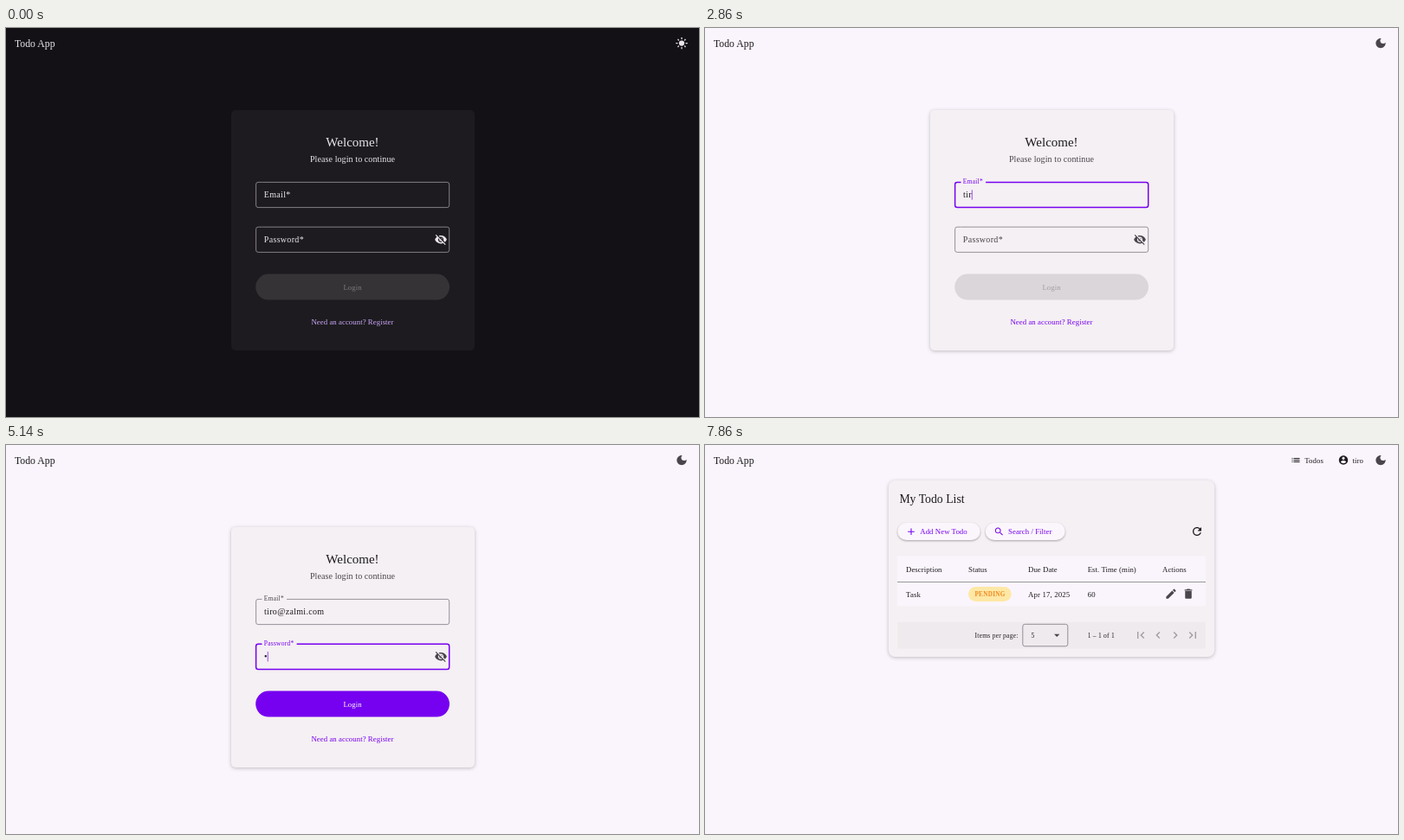
These frames come from a looping animation (800x450 px, 8000 ms). An HTML page:

```html
<!DOCTYPE html>
<html lang="en">
<head>
<meta charset="utf-8">
<title>Todo App</title>
<style>
  html, body { margin: 0; width: 100%; height: 100%; overflow: hidden; }
  svg {
    display: block; width: 100vw; height: 100vh;
    font-family: "Liberation Serif", "Times New Roman", serif;
    --bg: #faf5fc; --card: #f5f0f3; --ink: #1d1b1f; --soft: #4a454d; --line: #8d8790;
    --accent: #7600f0; --off: #dbd6da; --offInk: #a39ea3; --hover: #e3dee4;
    --shadow: rgba(0, 0, 0, .24);
  }
  svg.dark {
    --bg: #131115; --card: #1d1b1f; --ink: #e9e4ea; --soft: #e9e4ea; --line: #8f8a92;
    --accent: #cba8fa; --off: #353336; --offInk: #7c787d; --hover: #2d2b2f;
    --shadow: transparent;
  }
  text { fill: var(--ink); white-space: pre; }
  .mid { text-anchor: middle; }
  .soft { fill: var(--soft); }
  .accent { fill: var(--accent); }
  .body { font-size: 10px; letter-spacing: .3125px; }
  .label { font-size: 8.75px; letter-spacing: .0625px; }
  .cell { font-size: 8.75px; letter-spacing: .156px; }
  .small { font-size: 7.5px; letter-spacing: .25px; }
  .float { font-size: 7.5px; letter-spacing: .234px; }
  .card { fill: var(--card); filter: drop-shadow(0 1.5px 2px var(--shadow)); }
  .pill { fill: #fbf6fc; filter: drop-shadow(0 1px 1px rgba(0, 0, 0, .32)); }
  .outline { fill: none; }
</style>
</head>
<body>
<svg id="stage" viewBox="0 0 800 450">
  <rect width="800" height="450" fill="var(--bg)"/>
  <text x="10" y="22" font-size="11.75">Todo App</text>
  <circle id="themeHover" cx="780" cy="17.5" r="10" fill="var(--hover)"/>
  <g id="sun" transform="translate(780 17.5) scale(.625)" fill="var(--ink)" stroke="var(--ink)" stroke-width="2" stroke-linecap="round">
    <circle r="5" stroke="none"/>
  </g>
  <g id="moon"></g>

  <g id="login">
    <rect class="card" x="260" y="95" width="281" height="278" rx="5"/>
    <text class="mid" x="400" y="137" font-size="15">Welcome!</text>
    <text class="mid soft" x="400" y="155.2" font-size="10" letter-spacing=".094">Please login to continue</text>
    <g id="email"></g>
    <g id="password"></g>
    <circle id="eyeHover" cx="502" cy="244.7" r="10" fill="var(--hover)"/>
    <g id="eye"></g>
    <rect id="button" x="288.2" y="284.6" width="223.8" height="30" rx="15"/>
    <text id="buttonText" class="label mid" x="400" y="302.7">Login</text>
    <text class="label mid accent" x="400" y="343">Need an account? Register</text>
  </g>

  <g id="todos">
    <text class="label" x="692.3" y="20.5">Todos</text>
    <text class="label" x="747.5" y="20.5">tiro</text>
    <rect class="card" x="212" y="41" width="376" height="204" rx="7.5"/>
    <text x="224.4" y="67.3" font-size="13.75">My Todo List</text>
    <rect class="pill" x="222.3" y="90" width="95.4" height="20" rx="10"/>
    <rect class="pill" x="323.7" y="90" width="92" height="20" rx="10"/>
    <text class="label accent" x="248.3" y="103">Add New Todo</text>
    <text class="label accent" x="350" y="103">Search / Filter</text>
    <rect x="222" y="128.5" width="356" height="58" fill="var(--bg)"/>
    <rect x="222" y="158" width="356" height=".8" fill="#858088"/>
    <g id="table"></g>
    <rect x="304" y="164" width="49.7" height="17" rx="8.5" fill="#fee8a6"/>
    <text class="mid" x="329" y="175.2" font-size="7.2" font-weight="bold" letter-spacing=".3" style="fill:#ee8a1f">PENDING</text>
    <rect x="222" y="205" width="356" height="30.5" fill="#efeaee"/>
    <text class="small" x="311.6" y="222.8">Items per page:</text>
    <rect x="366.8" y="207.3" width="52" height="25.5" rx="2.5" fill="none" stroke="#7d7880" stroke-width=".8"/>
    <text class="small" x="376.5" y="222.8">5</text>
    <path d="M403 218.7h6.4l-3.2 3.2z" fill="#4a454d"/>
    <text class="small" x="441.7" y="222.8">1 – 1 of 1</text>
  </g>
</svg>
<script>
const NS = "http://www.w3.org/2000/svg";
const LOOP = 8000;
const ADDRESS = "tiro@zalmi.com";
const $ = id => document.getElementById(id);
const stage = $("stage");

function add(parent, tag, attrs, text = "") {
  const node = document.createElementNS(NS, tag);
  for (const key in attrs) node.setAttribute(key, attrs[key]);
  node.textContent = text;
  return parent.appendChild(node);
}

const show = (node, on) => node.setAttribute("visibility", on ? "visible" : "hidden");
const display = (node, on) => { node.style.display = on ? "" : "none"; };

// Icons live on a 24-unit grid and are placed by their centre.
const ICONS = {
  moon: "M12 3c-4.97 0-9 4.03-9 9s4.03 9 9 9 9-4.03 9-9c0-.46-.04-.92-.1-1.36-.98 1.37-2.58 2.26-4.4 2.26-2.98 0-5.4-2.42-5.4-5.4 0-1.81.89-3.42 2.26-4.4-.44-.06-.9-.1-1.36-.1z",
  eyeOff: "M12 7c2.76 0 5 2.24 5 5 0 .65-.13 1.26-.36 1.83l2.92 2.92c1.51-1.26 2.7-2.89 3.43-4.75-1.73-4.39-6-7.5-11-7.5-1.4 0-2.74.25-3.98.7l2.16 2.16C10.74 7.13 11.35 7 12 7zM2 4.27l2.28 2.28.46.46C3.08 8.3 1.78 10.02 1 12c1.73 4.39 6 7.5 11 7.5 1.55 0 3.03-.3 4.38-.84l.42.42L19.73 22 21 20.73 3.27 3 2 4.27zM7.53 9.8l1.55 1.55c-.05.21-.08.43-.08.65 0 1.66 1.34 3 3 3 .22 0 .44-.03.65-.08l1.55 1.55c-.67.33-1.41.53-2.2.53-2.76 0-5-2.24-5-5 0-.79.2-1.53.53-2.2zm4.31-.78l3.15 3.15.02-.16c0-1.66-1.34-3-3-3l-.17.01z",
  list: "M3 13h2v-2H3v2zm0 4h2v-2H3v2zm0-8h2V7H3v2zm4 4h14v-2H7v2zm0 4h14v-2H7v2zM7 7v2h14V7H7z",
  account: "M12 2C6.48 2 2 6.48 2 12s4.48 10 10 10 10-4.48 10-10S17.52 2 12 2zm0 3c1.66 0 3 1.34 3 3s-1.34 3-3 3-3-1.34-3-3 1.34-3 3-3zm0 14.2c-2.5 0-4.71-1.28-6-3.22.03-1.99 4-3.08 6-3.08 1.99 0 5.97 1.09 6 3.08-1.29 1.94-3.5 3.22-6 3.22z",
  plus: "M19 13h-6v6h-2v-6H5v-2h6V5h2v6h6v2z",
  search: "M15.5 14h-.79l-.28-.27C15.41 12.59 16 11.11 16 9.5 16 5.91 13.09 3 9.5 3S3 5.91 3 9.5 5.91 16 9.5 16c1.61 0 3.09-.59 4.23-1.57l.27.28v.79l5 4.99L20.49 19l-4.99-5zm-6 0C7.01 14 5 11.99 5 9.5S7.01 5 9.5 5 14 7.01 14 9.5 11.99 14 9.5 14z",
  refresh: "M17.65 6.35C16.2 4.9 14.21 4 12 4c-4.42 0-7.99 3.58-7.99 8s3.57 8 7.99 8c3.73 0 6.84-2.55 7.73-6h-2.08c-.82 2.33-3.04 4-5.65 4-3.31 0-6-2.69-6-6s2.69-6 6-6c1.66 0 3.14.69 4.22 1.78L13 11h7V4l-2.35 2.35z",
  pencil: "M3 17.25V21h3.75L17.81 9.94l-3.75-3.75L3 17.25zM20.71 7.04c.39-.39.39-1.02 0-1.41l-2.34-2.34c-.39-.39-1.02-.39-1.41 0l-1.83 1.83 3.75 3.75 1.83-1.83z",
  bin: "M6 19c0 1.1.9 2 2 2h8c1.1 0 2-.9 2-2V7H6v12zM19 4h-3.5l-1-1h-5l-1 1H5v2h14V4z",
  first: "M18.41 16.59L13.82 12l4.59-4.59L17 6l-6 6 6 6zM6 6h2v12H6z",
  prev: "M15.41 7.41L14 6l-6 6 6 6 1.41-1.41L10.83 12z",
  next: "M10 6L8.59 7.41 13.17 12l-4.58 4.59L10 18l6-6z",
  last: "M5.59 7.41L10.18 12l-4.59 4.59L7 18l6-6-6-6zM16 6h2v12h-2z"
};

function icon(parent, name, x, y, fill = "var(--soft)", scale = .625) {
  add(parent, "path", {
    d: ICONS[name], fill,
    transform: `translate(${x} ${y}) scale(${scale}) translate(-12 -12)`
  });
}

for (let i = 0; i < 8; i++) {
  const [from, to] = i % 2 ? [8, 9.5] : [8, 10];
  add($("sun"), "path", { d: `M${from} 0H${to}`, transform: `rotate(${i * 45})` });
}
icon($("moon"), "moon", 780, 17.5);
icon($("eye"), "eyeOff", 502, 244.7);

const todos = $("todos");
icon(todos, "list", 682, 17.5, "var(--ink)", .5);
icon(todos, "account", 737, 17.5, "var(--ink)", .52);
icon(todos, "plus", 238, 100.2, "var(--accent)", .54);
icon(todos, "search", 339.5, 100.2, "var(--accent)", .52);
icon(todos, "refresh", 568, 100, "var(--ink)");
icon(todos, "pencil", 538, 172.2);
icon(todos, "bin", 558, 172.2);
["first", "prev", "next", "last"].forEach((name, i) =>
  icon(todos, name, 503 + i * 20, 220, "#a09ba1", .66));

const columns = [
  [232, "Description", "Task"], [304, "Status", ""], [373, "Due Date", "Apr 17, 2025"],
  [441.7, "Est. Time (min)", "60"], [528, "Actions", ""]
];
for (const [x, head, value] of columns) {
  add($("table"), "text", { x, y: 147, class: "label" }, head);
  add($("table"), "text", { x, y: 175.8, class: "cell" }, value);
}

function makeField(group, name, top) {
  const border = add(group, "path", { class: "outline" });
  const label = add(group, "text", { x: 297.8 }, name + "*");
  const value = add(group, "text", { x: 298, y: top + 18.3, class: "body" });
  const caret = add(group, "rect", { y: top + 9.3, width: .7, height: 11.4, fill: "var(--accent)" });
  return ({ text, focus, tone = "var(--line)" }) => {
    const raised = focus || text !== "";
    label.setAttribute("class", raised ? "float" : "body");
    label.setAttribute("y", raised ? top + 2.1 : top + 18.3);
    label.style.fill = focus ? "var(--accent)" : "var(--soft)";
    value.textContent = text;
    const l = 288.6, r = 511.7, t = top + .4, b = top + 29.6, c = 2.5;
    const gap = raised ? 298 + label.getComputedTextLength() + 3 : 295.5;
    border.setAttribute("d", `M${gap} ${t}H${r - c}Q${r} ${t} ${r} ${t + c}V${b - c}Q${r} ${b} ${r - c} ${b}` +
      `H${l + c}Q${l} ${b} ${l} ${b - c}V${t + c}Q${l} ${t} ${l + c} ${t}H295.5`);
    border.setAttribute("stroke", focus ? "var(--accent)" : tone);
    border.setAttribute("stroke-width", focus ? 1.5 : .9);
    show(caret, focus);
    caret.setAttribute("x", 298 + (text ? value.getComputedTextLength() : 0));
  };
}
const drawEmail = makeField($("email"), "Email", 178);
const drawPassword = makeField($("password"), "Password", 229.8);

// Moments at which the address grows, with its length from then on.
const TYPING = [
  [2570, 1], [2710, 2], [2860, 3], [3000, 4], [3290, 5], [3570, 6],
  [3710, 7], [4000, 9], [4140, 10], [4290, 12], [4430, 14]
];
const typedAt = t => TYPING.reduce((n, [at, length]) => t >= at ? length : n, 0);
const within = (t, from, to) => t >= from && t < to;

function draw(t) {
  const dark = t < 1710;
  const onList = t >= 7000;
  stage.setAttribute("class", dark ? "dark" : "light");
  display($("sun"), dark);
  display($("moon"), !dark);
  display($("themeHover"), within(t, 1430, 2000));
  display($("login"), !onList);
  display(todos, onList);
  if (onList) return;

  const dots = Math.max(0, Math.min(7, Math.floor((t - 5130) / 143) + 1));
  const left = t >= 6140;
  drawEmail({
    text: ADDRESS.slice(0, typedAt(t)),
    focus: within(t, 2430, 4860),
    tone: left ? "#716b7a" : undefined
  });
  drawPassword({
    text: "•".repeat(dots),
    focus: within(t, 4860, 6140),
    tone: left ? "#aaa5ad" : undefined
  });
  display($("eyeHover"), within(t, 6140, 6570));

  const ready = dots > 0;
  $("button").style.fill = ready ? "var(--accent)" : "var(--off)";
  $("buttonText").style.fill = ready ? "#fff" : "var(--offInk)";
}

const start = performance.now();
function tick() {
  draw((performance.now() - start) % LOOP);
  requestAnimationFrame(tick);
}
tick();
</script>
</body>
</html>
```
